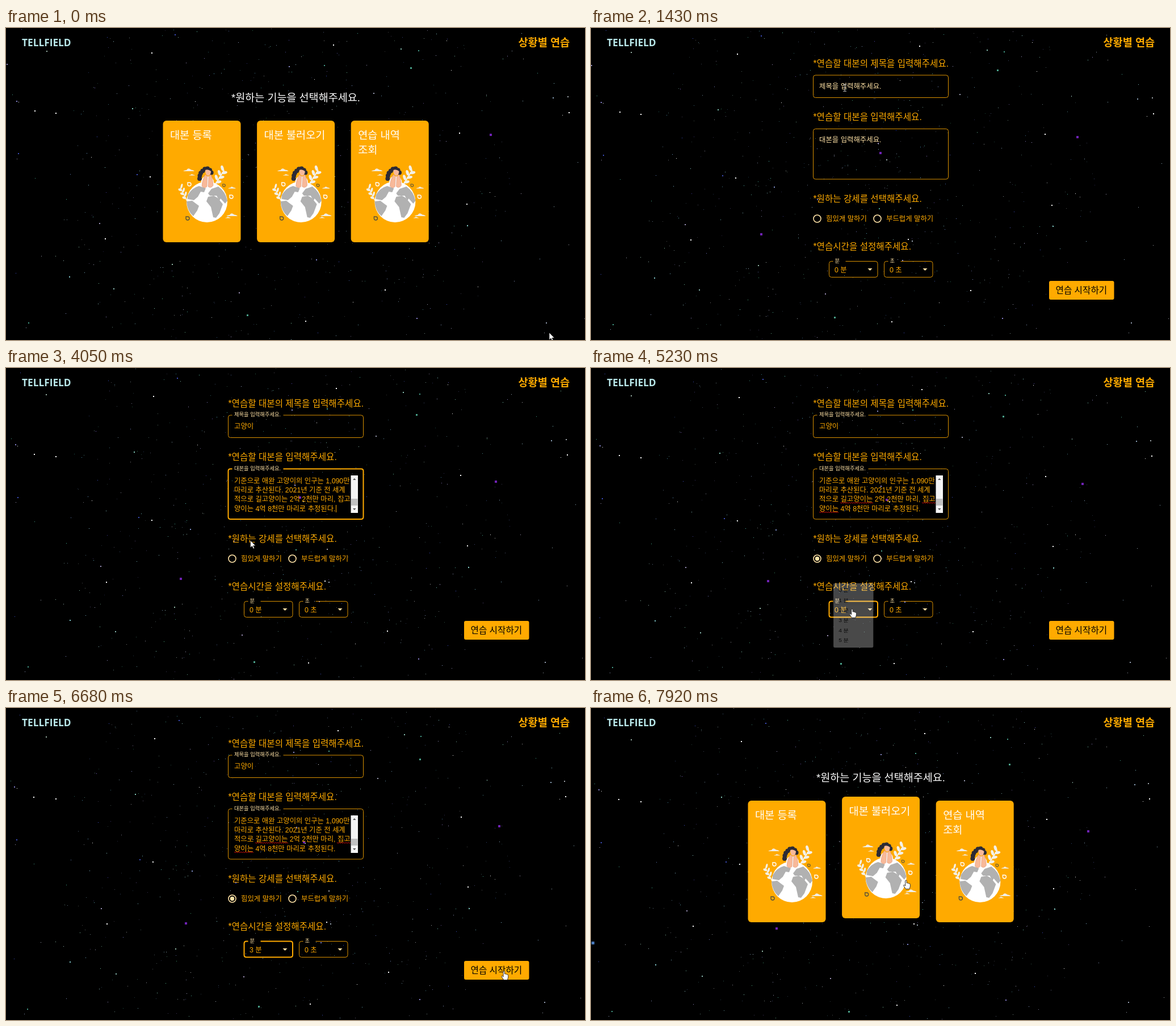
Write an HTML page with a canvas that moves like this. It is 1020 px wide and 549 px high and loops after 7.99 s.

```html
<!DOCTYPE html>
<html lang="ko">
<head>
<meta charset="utf-8">
<title>상황별 연습</title>
<style>
  html, body { margin: 0; width: 100%; height: 100%; overflow: hidden; background: #000; }
  canvas, #stage { position: absolute; left: 0; top: 0; width: 1020px; height: 549px; }
  text { font-family: "Liberation Sans", "Noto Sans CJK KR", "Noto Sans CJK", sans-serif; font-weight: 350; white-space: pre; }
  .logo { font-family: "Open Sans", "Noto Sans", sans-serif; font-weight: 700; }
  .bold { font-weight: 700; }
</style>
</head>
<body>
<canvas id="sky" width="1020" height="549"></canvas>
<svg width="0" height="0" style="position:absolute">
  <defs>
    <g id="leaf" fill="#f4f1e8"></g>
    <path id="cloud" d="M0 5Q3 3 6 3Q8 -1 12 1Q14 3 17 3Q19 4 20 5Z" fill="#f1eee6"/>
    <path id="pin" d="M-3 -3H0A3 3 0 1 1 -3 0Z" fill="none" stroke-width="1.4"/>
    <g id="art">
      <use href="#leaf" x="367" y="276"/>
      <use href="#leaf" transform="translate(319 303) scale(-.68 .85)"/>
      <use href="#cloud" x="312" y="247"/>
      <use href="#cloud" transform="translate(322 257) scale(.55 .5)"/>
      <use href="#cloud" transform="translate(391 279) scale(.7)"/>
      <use href="#cloud" x="388" y="326"/>
      <use href="#cloud" transform="translate(386 332) scale(.5)"/>
      <circle cx="354" cy="306" r="36" fill="#fff"/>
      <g fill="#b1b1b1">
        <path d="M320 294Q328 281 340 278L352 282L349 289L343 288L338 297L331 303L320 301Z"/>
        <path d="M318 305L328 304L340 313L337 321L330 331Q319 322 318 305Z"/>
        <path d="M356 291L362 283L374 279Q387 288 390 304L386 309L378 300L376 304L371 295L359 295Z"/>
        <path d="M356 297L366 295L373 299L382 310L376 326L370 334L365 333L361 315L353 305Z"/>
      </g>
      <path d="M345 278Q341 266 350 261H360Q369 267 365 278Z" fill="#fff"/>
      <path d="M341 265Q341 255 347 251Q353 244 359 250L363 257" fill="none" stroke="#2b2a35"
        stroke-width="8" stroke-linecap="round" stroke-linejoin="round" stroke-dasharray="0 5"/>
      <path d="M351 250Q356 248 361 252Q361 259 356 260Q351 259 351 250Z" fill="#f8b999"/>
      <path d="M351 258L355 261L354 279Q349 284 345 278Q345 268 351 258ZM361 258L357 261L356 279Q361 283 365 277Q365 267 361 258Z"
        fill="#f8b999" stroke="#d58f70" stroke-width=".5"/>
      <use href="#pin" x="323" y="275" stroke="#fff"/>
      <use href="#pin" transform="translate(384 277) scale(.75)" stroke="#55503c"/>
      <use href="#pin" x="397" y="297" stroke="#fff"/>
      <use href="#pin" x="320" y="335" stroke="#55503c"/>
    </g>
    <path id="arrow" d="M0 0V12.6L3 9.9L5 14.6L7 13.7L5 9.3H9Z" fill="#fff" stroke="#000" stroke-width=".6"/>
    <path id="hand" d="M-1.3 .8Q0 -.8 1.2 .8V5Q2.8 4.2 3.5 5.5Q5 4.8 5.6 6.2Q7.4 5.8 7.4 7.6V11L6 15.5H-.5L-4.4 9.6Q-4.4 7.6 -2.6 8.6L-1.3 10Z" fill="#fff" stroke="#222" stroke-width=".9"/>
    <path id="ibeam" d="M-3 -6H3M0 -6V6M-3 6H3" fill="none" stroke="#c8c8c8"/>
  </defs>
</svg>
<svg id="stage" viewBox="0 0 1020 549"></svg>
<script>
const LOOP = 7990, ORANGE = '#ffaa00', CREAM = '#ffe2a6';
// Scene times in ms
const FORM = 900, TITLE = 1620, TYPING = 1940, SCRIPT = 2950, PASTE = 3400, RADIO = 4520,
      MENU = 5150, PICK = 6230, BLANK = 7080, BACK = 7600;

const ctx = document.getElementById('sky').getContext('2d');
const stage = document.getElementById('stage');
const clamp = v => Math.max(0, Math.min(1, v));
const ease = v => { v = clamp(v); return v * v * (3 - 2 * v); };

// Leaflets alternate along a slanted stem
let leaf = '<path d="M0 0L17 -27L18 -25L2 1Z"/>';
for (let i = 1; i <= 6; i++) {
  const side = i % 2 ? 1 : -1;
  leaf += `<ellipse cx="5" rx="5" ry="2.5" transform="translate(${2.6 * i} ${-4.1 * i}) rotate(${-60 + 48 * side})"/>`;
}
document.getElementById('leaf').innerHTML = leaf;

// ---- stars: a slowly turning cloud of points, near ones moving faster ----
let seed = 11;
const rnd = () => (seed = (seed * 16807) % 2147483647) / 2147483647;
const stars = [];
function far(x, y, size, color) {
  stars.push({ x, y, size, color, vx: 1.2 - 1.8 * ((x - 480) / 480) ** 2, vy: 1.6 - x * y / 3e5 });
}
function near(x, y, size, color) {
  stars.push({ x, y, size, color, vx: 3.8 - .0018 * x, vy: 3 });
}
const tint = light => `hsl(${150 + 110 * rnd()} ${45 * rnd()}% ${light}%)`;

for (let i = 0; i < 650; i++) {
  const a = rnd() * 2 * Math.PI, r = 400 * rnd() ** .55;
  far(490 + r * Math.cos(a), 275 + r * Math.sin(a), 1, tint(18 + 42 * rnd() ** 1.5));
}
for (let i = 0; i < 140; i++)
  far(rnd() * 1020, rnd() * 549, i % 4 ? 1 : 2, i % 3 ? tint(65) : ['#46a08c', '#3d4fc0', '#eee'][i % 9 / 3]);
for (const [x, y] of [[88, 150], [51, 146], [577, 30], [668, 461], [175, 371], [799, 185], [257, 44], [992, 149]])
  far(x, y, 2, '#fff');
for (const [x, y] of [[854, 188], [295, 359], [506, 216]]) near(x, y, 4, '#6f22b4');
for (const [x, y] of [[713, 70], [425, 505]]) near(x, y, 3, '#4aa28a');
near(-34, 384, 5, '#4878b8');

function drawSky(t) {
  const s = t / 1000 + (t >= BACK ? 1.75 : 0);
  ctx.fillStyle = '#000';
  ctx.fillRect(0, 0, 1020, 549);
  for (const p of stars) {
    ctx.fillStyle = p.color;
    ctx.fillRect(Math.round(p.x + p.vx * s - p.size / 2), Math.round(p.y + p.vy * s - p.size / 2), p.size, p.size);
  }
}

// ---- pointer: each stop is [arrival time, x, y], reached in a 400 ms glide ----
const stops = [
  [0, 957, 536], [650, 345, 290], [1300, 447, 105], [1800, 451, 117], [2900, 470, 215], [3900, 432, 302],
  [4400, 400, 334], [5000, 460, 424], [5850, 475, 462], [6700, 880, 463], [7100, 905, 466], [7820, 555, 303]
];
function pointer(t) {
  let [, x, y] = stops[0];
  for (const [at, nx, ny] of stops.slice(1)) {
    const e = ease((t - at) / 400 + 1);
    x += (nx - x) * e;
    y += (ny - y) * e;
  }
  return [x, y];
}
const within = ([x, y], left, top, w, h) => x >= left && x <= left + w && y >= top && y <= top + h;

// ---- layout ----
const TITLE_BOX = [391.5, 83, 238, 39.5], SCRIPT_BOX = [391.5, 177.5, 238, 88.5];
const MIN_BOX = [419.5, 410.5, 85.5, 28], SEC_BOX = [516.5, 410.5, 85.5, 28];
const START = [807, 445, 114.5, 33], MENU_BOX = [419.5, 373, 85.5, 165.5], RADIOS = [391, 326, 213, 19];
const cardBox = i => [276.5 + 165.6 * i, 163, 137, 214];
const onCards = t => t >= 0 && t < FORM || t >= BACK;

function pointerKind(t, p) {
  const over = box => within(p, ...box);
  if (onCards(t)) return [0, 1, 2].some(i => over(cardBox(i))) ? 'hand' : 'arrow';
  if (t >= BLANK) return 'arrow';
  if (over(TITLE_BOX) || over(SCRIPT_BOX)) return 'ibeam';
  const links = [RADIOS, MIN_BOX, SEC_BOX, START];
  if (t >= MENU && t < PICK) links.push(MENU_BOX);
  return links.some(over) ? 'hand' : 'arrow';
}

// ---- shapes ----
const text = (x, mid, size, fill, s, cls = '') =>
  `<text x="${x}" y="${mid + size * .37}" font-size="${size}" fill="${fill}" class="${cls}">${s}</text>`;
const rect = (x, y, w, h, fill, r = 0) =>
  `<rect x="${x}" y="${y}" width="${w}" height="${h}" rx="${r}" fill="${fill}"/>`;
const caret = (x, y) => rect(x, y, 1, 13, ORANGE);

// Outlined box, with a gap of the given width in its top edge
function outline([x, y, w, h], gap, focus) {
  const from = gap ? x + 6 + gap : x + 4;
  return `<path d="M${from} ${y}H${x + w - 4}q4 0 4 4v${h - 8}q0 4 -4 4H${x + 4}q-4 0 -4 -4V${y + 4}q0 -4 4 -4${gap ? 'h3' : ''}"
    fill="none" stroke="${ORANGE}" stroke-width="${focus ? 2 : 1}" stroke-opacity="${focus ? 1 : .85}"/>`;
}
// Text field whose label shrinks into the top edge as p goes from 0 to 1
const field = (box, label, p, focus) => outline(box, 91 * p, focus) +
  text(402, box[1] + 19 - 20 * p, 12.4 - 3.1 * p, CREAM, label);

function squiggle(x0, x1, y) {
  let d = `M${x0} ${y}`;
  for (let x = x0, k = 1; x < x1; x += 2, k = -k) d += `l2 ${1.6 * k}`;
  return `<path d="${d}" fill="none" stroke="#e01010" stroke-width=".9"/>`;
}

function cards(t) {
  const titles = [['대본 등록'], ['대본 불러오기'], ['연습 내역', '조회']];
  let out = text(397, 122, 18.5, '#fff', '*원하는 기능을 선택해주세요.');
  titles.forEach((lines, i) => {
    const box = cardBox(i);
    let lift = 0;
    for (let past = t; past > t - 120; past -= 20)
      if (onCards(past) && within(pointer(past), ...box)) lift += 7 / 6;
    out += `<g transform="translate(0 ${-lift})">` + rect(...box, ORANGE, 6) +
      lines.map((s, n) => text(box[0] + 12.5, 188 + 26 * n, 18.6, '#fff', s)).join('') +
      `<use href="#art" x="${165.7 * i}"/></g>`;
  });
  return out;
}

function titleField(t) {
  const p = ease((t - TITLE) / 200), focus = t >= TITLE && t < SCRIPT;
  const steps = ['', 'ㄱ', '고', '공', '고야', '고양', '고양ㅇ', '고양이'];
  const typed = steps[Math.max(0, Math.min(7, Math.ceil((t - TYPING) / 125)))];
  const end = 402 + typed.length * 11.4;
  let out = field(TITLE_BOX, '제목을 입력해주세요.', p, focus) + text(402, 102.5, 12.4, ORANGE, typed);
  if (focus && p === 1) out += caret(end, 96);
  if (focus && typed) out += rect(end - 11.4, 109, 11.4, 1, ORANGE);
  return out;
}

function scriptField(t) {
  const p = ease((t - SCRIPT) / 200), focus = t >= SCRIPT && t < RADIO, pasted = t >= PASTE;
  let out = field(SCRIPT_BOX, '대본을 입력해주세요.', p, focus);
  if (pasted) {
    const lines = ['기준으로 애완 고양이의 인구는 1,090만', '마리로 추산된다. 2021년 기준 전 세계',
      '적으로 길고양이는 2억 2천만 마리, 집고', '양이는 4억 8천만 마리로 추정된다.'];
    lines.forEach((s, i) => out += text(402, 198 + 16.4 * i, 12.35, ORANGE, s));
    out += rect(607.5, 189, 12.5, 66, '#f4f4f4') + rect(608, 230, 11.5, 12, '#c1c1c1') +
      '<path d="M611 197l2.8 -3l2.8 3zM611 247l2.8 3l2.8 -3z" fill="#555"/>';
    if (t >= RADIO) out += squiggle(439, 497, 236.5) + squiggle(583, 607, 236.5) + squiggle(402, 436, 253);
  }
  if (focus && p === 1) out += pasted ? caret(581, 241) : caret(402, 190);
  return out;
}

const radio = (x, s, on) =>
  `<circle cx="${x}" cy="335.5" r="6.5" fill="none" stroke="${CREAM}" stroke-width="1.6"/>` +
  (on ? `<circle cx="${x}" cy="335.5" r="3.7" fill="${CREAM}"/>` : '') + text(x + 15.5, 335, 12.4, ORANGE, s);

const select = (box, unit, value, focus) =>
  outline(box, 23, focus) + text(box[0] + 10, 410, 9.3, CREAM, unit) +
  text(box[0] + 9.5, 425, 12.4, ORANGE, `${value} ${unit}`) +
  `<path d="M${box[0] + 68} 423h8l-4 4z" fill="${CREAM}"/>`;

function menu(t, p) {
  const grow = ease((t - MENU) / 230), fade = 1 - clamp((t - PICK) / 180);
  if (!grow || !fade) return '';
  const [x, top, w] = MENU_BOX, row = 25.7;
  let out = rect(...MENU_BOX, '#fff', 3);
  for (let i = 0; i < 6; i++) {
    const y = top + 5.2 + row * i;
    if (i === 0 || within(p, x, y, w, row)) out += rect(x, y, w, row, i ? '#f5f5f5' : '#edf3fc');
    out += text(x + 11, y + 13, 12.4, '#222', `${i} 분`);
  }
  const sx = .75 + .25 * grow, sy = .56 + .44 * grow;
  return `<g opacity="${grow * fade}" transform="translate(462 391) scale(${sx} ${sy}) translate(-462 -391)">${out}</g>`;
}

function form(t, p) {
  const head = (y, s) => text(391.5, y, 15.6, ORANGE, '*' + s);
  return head(62, '연습할 대본의 제목을 입력해주세요.') + titleField(t) +
    head(156, '연습할 대본을 입력해주세요.') + scriptField(t) +
    head(300, '원하는 강세를 선택해주세요.') +
    radio(398.5, '힘있게 말하기', t >= RADIO) + radio(504.5, '부드럽게 말하기', false) +
    head(384, '연습시간을 설정해주세요.') +
    select(MIN_BOX, '분', t >= PICK ? 3 : 0, t >= MENU) + select(SEC_BOX, '초', 0, false) +
    rect(...START, ORANGE, 3) + text(818.5, 461, 15.65, '#000', '연습 시작하기') +
    menu(t, p);
}

function draw(now) {
  const t = now % LOOP, p = pointer(t);
  drawSky(t);
  let out = text(28, 25.5, 17.3, '#b9e8ea', 'TELLFIELD', 'logo') +
    text(902.5, 25, 18.6, ORANGE, '상황별 연습', 'bold');
  if (onCards(t)) out += cards(t);
  else if (t < BLANK) out += form(t, p);
  stage.innerHTML = out + `<use href="#${pointerKind(t, p)}" x="${p[0]}" y="${p[1]}"/>`;
}

const start = performance.now();
function tick() {
  draw(performance.now() - start);
  requestAnimationFrame(tick);
}
tick();
</script>
</body>
</html>
```
